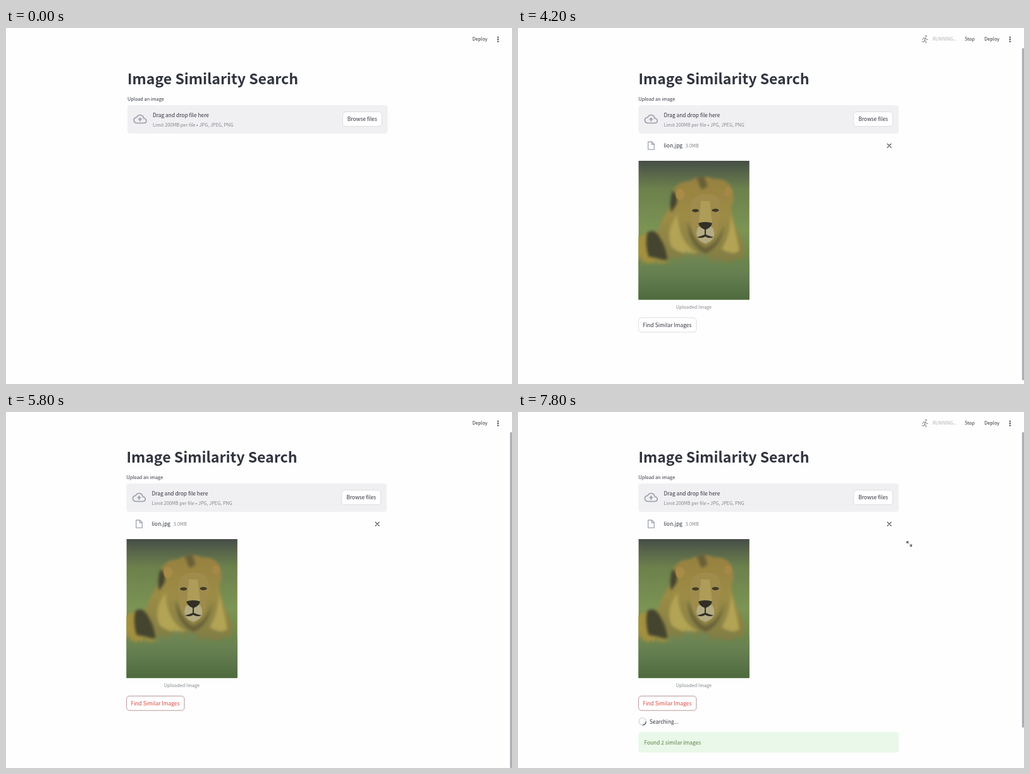
An HTML page that plays this animation: 800 by 563 pixels, repeating every 8 s.

```html
<!DOCTYPE html>
<html lang="en">
<head>
<meta charset="utf-8">
<title>Image Similarity Search</title>
<style>
  html, body { margin: 0; width: 100%; height: 100%; overflow: hidden; background: #fdfefd; }
  svg { display: block; }
  #stage { width: 100vw; height: 100vh; }
  text { font: 8.38px "Noto Sans CJK JP", "Noto Sans CJK SC", "Noto Sans CJK", "Noto Sans", sans-serif; fill: #31333f; white-space: pre; }
  .small { font-size: 7.33px; }
  .muted { fill: #85868e; }
  .title { font-size: 23.07px; font-weight: 700; }
  .button { fill: #fff; stroke: #d6d6da; stroke-width: .8; }
  .line { fill: none; stroke-linecap: round; stroke-linejoin: round; }
</style>
</head>
<body>
<svg id="stage" viewBox="0 0 800 563">
  <defs>
    <linearGradient id="meadow" x2="0" y2="1">
      <stop offset="0" stop-color="#454e46"/>
      <stop offset=".08" stop-color="#56634a"/>
      <stop offset=".2" stop-color="#6c804c"/>
      <stop offset=".5" stop-color="#7c9454"/>
      <stop offset="1" stop-color="#56743f"/>
    </linearGradient>
    <linearGradient id="grass" x2="0" y2="1">
      <stop offset="0" stop-color="#748a55"/>
      <stop offset=".45" stop-color="#657f50"/>
      <stop offset="1" stop-color="#4c683c"/>
    </linearGradient>
    <linearGradient id="mane" x2="0" y2="1">
      <stop offset="0" stop-color="#988040"/>
      <stop offset=".45" stop-color="#9c8c45"/>
      <stop offset="1" stop-color="#7f7c45"/>
    </linearGradient>
    <filter id="soft" color-interpolation-filters="sRGB"><feGaussianBlur stdDeviation="2"/></filter>
    <filter id="fine" color-interpolation-filters="sRGB"><feGaussianBlur stdDeviation=".8"/></filter>

    <symbol id="photo" viewBox="0 0 176 220">
      <rect width="176" height="220" fill="url(#meadow)"/>
      <g filter="url(#soft)">
        <path d="M-5 124Q15 110 42 112L60 165H-5Z" fill="#a3903f"/>
        <path d="M55 48Q62 32 82 32Q100 20 120 29Q142 27 149 46Q154 60 147 74Q150 100 163 122Q174 142 164 156Q110 172 50 160Q22 160 18 140Q32 108 40 88Q52 74 55 48Z" fill="url(#mane)"/>
        <path d="M54 48Q62 50 61 68L52 82Q48 66 54 48ZM14 114Q26 106 34 122Q44 136 46 158L16 152Q10 132 14 114Z" fill="#45442f"/>
        <path d="M92 27L104 24L110 40L100 46Z" fill="#696038"/>
        <path d="M62 85Q64 130 94 146Q70 152 52 136Q42 112 62 85ZM146 84Q148 112 132 140Q152 152 160 142Q154 110 146 84Z" fill="#b3a354"/>
        <path d="M78 96Q78 132 106 148Q132 136 136 100Q128 130 106 138Q88 130 78 96Z" fill="#696239"/>
      </g>
      <g filter="url(#fine)">
        <ellipse cx="66" cy="53" rx="7" ry="9" fill="#a98a47"/>
        <ellipse cx="142" cy="49" rx="6" ry="8" fill="#a58747"/>
        <path d="M86 60Q106 46 127 59Q134 78 128 94Q126 126 106 133Q86 126 84 96Q78 76 86 60Z" fill="#9f8b4b"/>
        <path d="M99 64H113L117 98H96Z" fill="#ae9c59"/>
        <path d="M94 106Q106 99 118 106Q126 125 106 131Q87 124 94 106Z" fill="#b3ab83"/>
        <path d="M95 99Q106 95 117 99Q115 106 107 109V117Q114 120 119 121Q112 124 106 120Q100 124 93 121Q98 120 105 117V109Q97 106 95 99Z" fill="#312f26"/>
        <ellipse cx="90.500" cy="79" rx="5.500" ry="2.600" fill="#403a26"/>
        <ellipse cx="122" cy="78.500" rx="5.500" ry="2.600" fill="#403a26"/>
      </g>
      <path id="blades" fill="url(#grass)" filter="url(#soft)"/>
    </symbol>
  </defs>

  <g id="page">
    <text class="title" x="192" y="89">Image Similarity Search</text>
    <text class="small" x="192" y="114.6">Upload an image</text>
    <rect x="192" y="122" width="411.5" height="45" rx="4.5" fill="#f0f0f2"/>
    <path transform="translate(201.2 133.2) scale(.9)" fill="#a3a5b2" d="M19.35 10.04C18.67 6.59 15.64 4 12 4 9.11 4 6.6 5.64 5.35 8.04 2.34 8.36 0 10.91 0 14c0 3.31 2.69 6 6 6h13c2.76 0 5-2.24 5-5 0-2.64-2.05-4.78-4.65-4.96zM19 18H6c-2.21 0-4-1.79-4-4 0-2.05 1.53-3.76 3.56-3.97l1.07-.11.5-.95C8.08 7.14 9.94 6 12 6c2.62 0 4.88 1.86 5.39 4.43l.3 1.5 1.53.11c1.56.1 2.78 1.41 2.78 2.96 0 1.65-1.35 3-3 3zM8 13h2.55v3h2.9v-3H16l-4-4z"/>
    <text x="232" y="141.4">Drag and drop file here</text>
    <text class="small muted" x="232" y="155.6">Limit 200MB per file</text>
    <text class="small muted" x="301" y="155.6" style="font-family: 'Liberation Sans', sans-serif">•</text>
    <text class="small muted" x="305.6" y="155.6">JPG, JPEG, PNG</text>
    <rect class="button" x="532.4" y="132.6" width="61.6" height="23" rx="4.5"/>
    <text x="539.8" y="147.4">Browse files</text>

    <g data-show="3400-8000">
      <path class="line" d="M207.3 180h6l3.7 3.7v8.5h-9.7zM213 180.2v3.8h3.8" stroke="#a3a5b2" stroke-width="1.3"/>
      <text x="232" y="189">lion.jpg</text>
      <text class="small muted" x="266.4" y="188.6">3.0MB</text>
      <path class="line" d="M585.6 183.1l6 6m0-6l-6 6" stroke="#31333f" stroke-width="1.1"/>
    </g>

    <g data-show="4200-8000">
      <use href="#photo" x="192" y="209.7" width="175.5" height="220"/>
      <text class="small muted" x="279.6" y="443.6" text-anchor="middle">Uploaded Image</text>
      <rect id="find" class="button" x="192.2" y="458.2" width="91.4" height="22.8" rx="4.5"/>
      <text id="findLabel" x="199.2" y="472.7">Find Similar Images</text>
    </g>

    <path class="line" data-show="4600-5400 6800-8000" d="M619 216.4l-2.6-2.6m0 2.6v-2.6h2.6M621.4 218.6l2.6 2.6m0-2.6v2.6h-2.6" stroke="#5b5c65" stroke-width="1.2"/>

    <g data-show="6600-7000 7400-8000">
      <g fill="none" stroke-width="1.2">
        <circle cx="198.4" cy="498.5" r="5.6" stroke="#d3d4da"/>
        <path id="spinner" d="M204 498.5a5.6 5.6 0 0 1-5.6 5.6" stroke="#4a4c66"/>
      </g>
      <text x="209.5" y="501.5">Searching...</text>
    </g>
    <g id="found" data-show="7000-8000">
      <rect x="192" y="490.5" width="411.5" height="32.6" rx="4.5" fill="#e9f8e8"/>
      <text x="201" y="510.1" style="fill: #55803f">Found 2 similar images</text>
    </g>
  </g>

  <use id="thumb" href="#photo" width="24" height="30" data-show="2400-3400"/>

  <text class="small" x="737.2" y="20.4">Deploy</text>
  <g fill="#31333f">
    <circle cx="777.8" cy="14.6" r="1.15"/><circle cx="777.8" cy="18" r="1.15"/><circle cx="777.8" cy="21.4" r="1.15"/>
  </g>
  <g data-show="3600-4600 6000-8000">
    <circle id="head" cy="12.8" r="1.4" fill="#9b9b9f"/>
    <path id="figure" class="line" stroke="#9b9b9f" stroke-width="1.3"/>
    <text class="small" x="655.4" y="20.4" style="fill: #b0b1b7">RUNNING...</text>
    <text class="small" x="706.3" y="20.4">Stop</text>
  </g>
  <rect id="scrollbar" data-show="4200-8000" x="796.8" y="32" width="3.2" rx="1" fill="#adadb5"/>
</svg>

<script>
const LOOP = 8000, STEP = 200;
const $ = id => document.getElementById(id);
const set = (id, attrs) => Object.entries(attrs).forEach(([k, v]) => $(id).setAttribute(k, v));

const timed = [...document.querySelectorAll('[data-show]')].map(el => ({
  el, spans: el.dataset.show.split(' ').map(s => s.split('-').map(Number))
}));
const dragPath = [[102, 209], [178, 209], [256, 208], [352, 190], [346, 132]];
const poses = [
  { head: 643.3, d: 'M638.8 15.6l3 .8h3l3-.8M642.3 16.5v7M644.3 16.5v7M643.3 16.5v3' },
  { head: 645.2, d: 'M639.8 18.4l1.4-2.2 3-.6 1.3 2.2 2.3.6M643.9 16l-1.2 3.6 2.3 1.6v2.6M642.7 19.6l-.9 2.2-3.2-.4' }
];

// Jagged upper edge of the foreground grass
let edge = 'M-5 225';
for (let i = 0; i <= 46; i++) {
  edge += `L${i * 4 - 4} ${154 + 7 * Math.sin(i * .21) + (i % 2 ? 8 : -4) + 3 * Math.sin(i * 5.3)}`;
}
set('blades', { d: edge + 'L182 225Z' });

const thumbEnd = t => t < 5000 ? 557 : t < 6600 ? 563 : t < 7000 ? 542 : t < 7400 ? 519 : 499;

function draw(now) {
  const t = Math.floor(now % LOOP / STEP) * STEP;
  for (const { el, spans } of timed) {
    el.style.display = spans.some(([a, b]) => t >= a && t < b) ? '' : 'none';
  }
  set('page', { transform: `translate(${t < 4200 ? 0 : -1.6} ${t < 5000 ? 0 : -9})` });

  const [x, y] = dragPath[Math.min(4, Math.max(0, (t - 2400) / STEP))];
  set('thumb', { x, y });

  const pose = poses[t / STEP % 2];
  set('head', { cx: pose.head });
  set('figure', { d: pose.d });

  const active = t >= 5400;
  $('find').style.stroke = !active ? '' : t < 5600 ? '#e8605f' : '#a8797b';
  $('findLabel').style.fill = active ? '#d94440' : '';

  set('spinner', { transform: `rotate(${(t - 7800) * .48} 198.4 498.5)` });
  set('found', { transform: `translate(0 ${t < 7400 ? 0 : 24.5})` });
  set('scrollbar', { height: thumbEnd(t) - 32 });
}

const start = performance.now();
function tick() {
  draw(performance.now() - start);
  requestAnimationFrame(tick);
}
tick();
</script>
</body>
</html>
```
